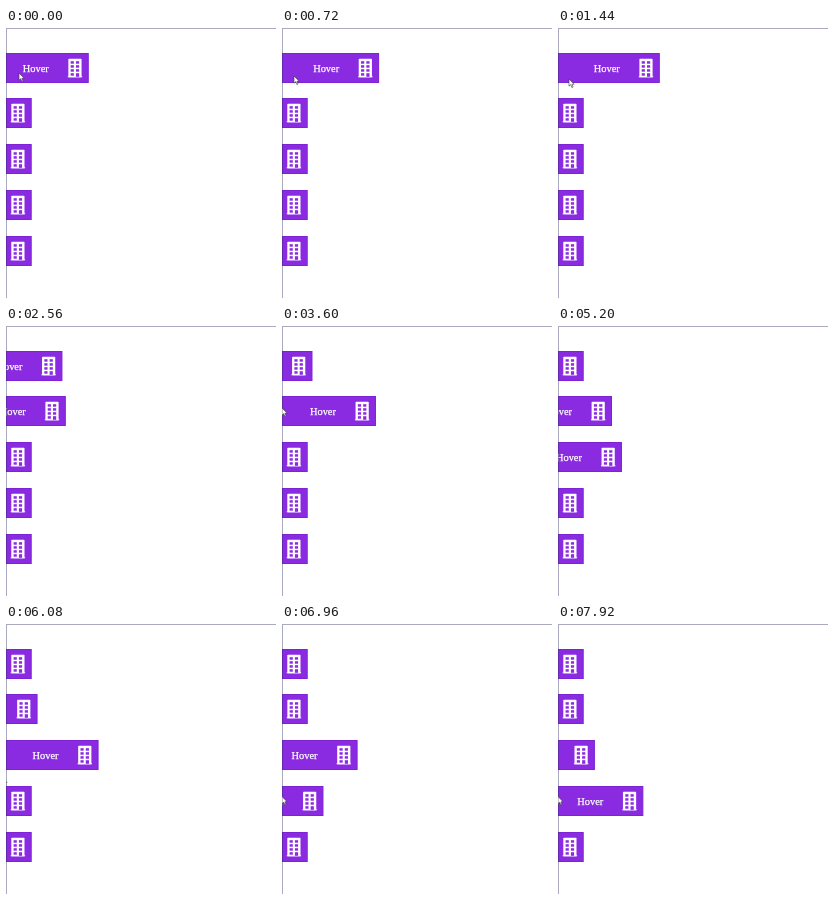
An HTML page that plays this animation: 270 by 270 pixels, repeating every 8000 ms.

```html
<!DOCTYPE html>
<html lang="en">
<head>
<meta charset="utf-8">
<title>Hover tabs</title>
<style>
html, body { margin: 0; width: 100%; height: 100%; overflow: hidden; background: #fff; }
svg { display: block; width: 100%; height: 100%; }
text { font: 10.4px "Liberation Serif", "Times New Roman", serif; fill: #fff; stroke: #fff; stroke-width: .25; }
</style>
</head>
<body>
<svg viewBox="0 0 270 270">
  <defs>
    <!-- origin is the top right corner of the tab -->
    <g id="tab">
      <rect x="-110" y=".5" width="109.5" height="29" fill="#8a2be2" stroke="#7d22d4"/>
      <text x="-66" y="19">Hover</text>
      <rect x="-20.4" y="5.7" width="13.2" height="18.6" rx=".8" fill="#fff"/>
      <rect x="-21" y="23.3" width="14.4" height="1" fill="#fff"/>
      <g id="windows" fill="#8a2be2"></g>
    </g>
  </defs>
  <g id="tabs"></g>
  <path d="M0 .5H270M.5 1V270" stroke="#2a2a60" opacity=".4" fill="none"/>
  <path id="cursor" d="M0 0V7.2L1.7 5.7L2.9 8.5L4.1 8L2.9 5.3H5.1Z" fill="#fff" stroke="#333" stroke-width=".6"/>
</svg>
<script>
const LOOP = 8000, STEP = 80, DURATION = 3000;
const CLOSED = 25.7, OPEN = 102;
const TABS = 5, TOP = 24.6, PITCH = 45.8;
// enter and leave times, one pair per tab touched
const hovers = [[-1350, 1525], [1757, 4150], [4318, 6390], [6480, LOOP]];
// time, x, y of the pointer, which slips past the left edge twice
const path = [[0, 13, 45], [1440, 11, 51], [2560, -8, 79], [3600, 0, 82], [5200, -8, 134], [6960, 0, 172.5], [LOOP, 0, 172.5]];

const find = id => document.getElementById(id);
const mix = (a, b, p) => a + (b - a) * p;
const place = (el, x, y) => el.setAttribute("transform", `translate(${x.toFixed(2)} ${y.toFixed(2)})`);

function add(parent, tag, attrs) {
  const el = document.createElementNS("http://www.w3.org/2000/svg", tag);
  for (const name in attrs) el.setAttribute(name, attrs[name]);
  return parent.appendChild(el);
}

const bezier = (a, b, u) => 3 * a * u * (1 - u) ** 2 + 3 * b * u * u * (1 - u) + u ** 3;

// CSS "ease": cubic-bezier(.25, .1, .25, 1)
function ease(p) {
  if (p <= 0) return 0;
  if (p >= 1) return 1;
  let lo = 0, hi = 1;
  for (let i = 0; i < 24; i++) {
    const mid = (lo + hi) / 2;
    if (bezier(.25, .25, mid) < p) lo = mid; else hi = mid;
  }
  return bezier(.1, 1, lo);
}

// a reversed transition is shortened by the progress already made
function openness(t, [enter, leave]) {
  if (t < leave) return ease((t - enter) / DURATION);
  const peak = ease((leave - enter) / DURATION);
  return peak * (1 - ease((t - leave) / (DURATION * peak)));
}

function pointerAt(t) {
  const i = path.findIndex(([time]) => time > t);
  const [t0, x0, y0] = path[i - 1], [t1, x1, y1] = path[i];
  const p = (t - t0) / (t1 - t0);
  return [mix(x0, x1, p), mix(y0, y1, p)];
}

// four rows of two windows, the last on the right being the door
for (let row = 0; row < 4; row++) {
  for (let col = 0; col < 2; col++) {
    const door = row === 3 && col === 1;
    add(find("windows"), "rect", { x: -18.1 + 5.3 * col, y: 8.2 + 4 * row, width: 3.2, height: door ? 3.6 : 2.5 });
  }
}

const tabs = Array.from({ length: TABS }, () => add(find("tabs"), "use", { href: "#tab" }));

function draw(now) {
  const t = Math.floor((now % LOOP) / STEP) * STEP;
  tabs.forEach((tab, i) => {
    const open = hovers[i] ? openness(t, hovers[i]) : 0;
    place(tab, mix(CLOSED, OPEN, open), Math.round(TOP + PITCH * i));
  });
  place(find("cursor"), ...pointerAt(t));
}

const start = performance.now();
function tick() {
  draw(performance.now() - start);
  requestAnimationFrame(tick);
}
tick();
</script>
</body>
</html>
```
